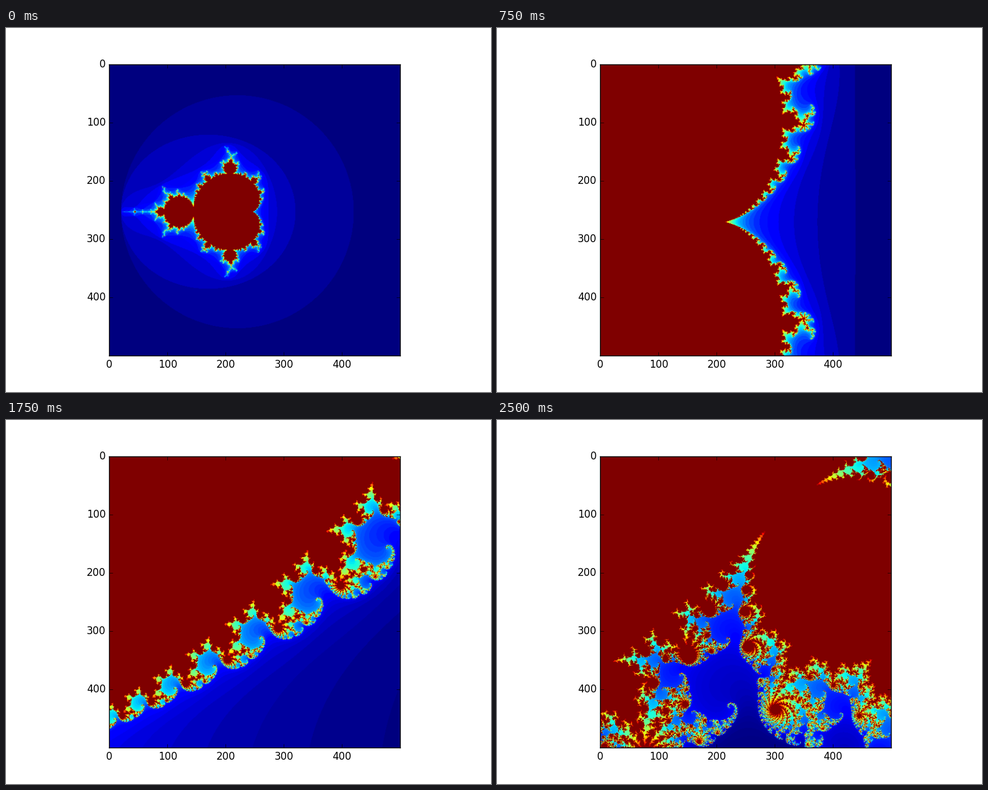
A matplotlib script that plays this animation: 800x600 px, repeating every 3750 ms.

```python
import numpy as np
import matplotlib.pyplot as plt
from matplotlib.animation import FuncAnimation

SIZE = 500
CENTER = 0.3 + 0.025j
FIRST_WIDTH = 5.0
LAST_ZOOM = 10
FRAMES, INTERVAL = 15, 250

plt.rcParams.update({
    "font.family": "DejaVu Sans",
    "font.size": 12,
    "text.hinting": "auto",
    "axes.linewidth": 1.0,
    "xtick.direction": "in",
    "ytick.direction": "in",
    "xtick.top": True,
    "ytick.right": True,
    "xtick.major.size": 4,
    "ytick.major.size": 4,
    "xtick.major.width": 0.5,
    "ytick.major.width": 0.5,
    "xtick.major.pad": 4,
    "ytick.major.pad": 4,
    "ytick.alignment": "center",
})


def iteration_limit(zoom):
    """Deeper views get more iterations."""
    if zoom < 6:
        return 40
    if zoom < 8:
        return 80
    return 100 if zoom < 10 else 200


def escape_counts(zoom):
    """Escape times on a square grid whose width halves with each zoom."""
    step = FIRST_WIDTH / 2**zoom / SIZE
    offset = (np.arange(SIZE) - SIZE // 2) * step
    c = (CENTER + offset[None, :] - 1j * offset[:, None]).ravel()
    limit = iteration_limit(zoom)
    counts = np.full(c.size, limit)
    alive = np.arange(c.size)
    z = np.zeros_like(c)
    for k in range(limit):
        escaped = z.real**2 + z.imag**2 > 4
        counts[alive[escaped]] = k
        inside = ~escaped
        alive, z, c = alive[inside], z[inside], c[inside]
        z = z * z + c
    return counts.reshape(SIZE, SIZE)


views = [escape_counts(zoom) for zoom in range(LAST_ZOOM + 1)]

fig = plt.figure(figsize=(8, 6), dpi=100, facecolor="white")
ax = fig.add_axes([0.125, 0.1, 0.775, 0.8])
image = ax.imshow(views[0], cmap="jet", interpolation="bilinear",
                  interpolation_stage="rgba")
ax.set_xticks(range(0, SIZE, 100))
ax.set_yticks(range(0, SIZE, 100))


def update(frame):
    image.set_data(views[min(frame, LAST_ZOOM)])
    image.autoscale()
    return [image]


anim = FuncAnimation(fig, update, frames=FRAMES, interval=INTERVAL,
                     repeat=True, repeat_delay=0, blit=False)
plt.show()
```
